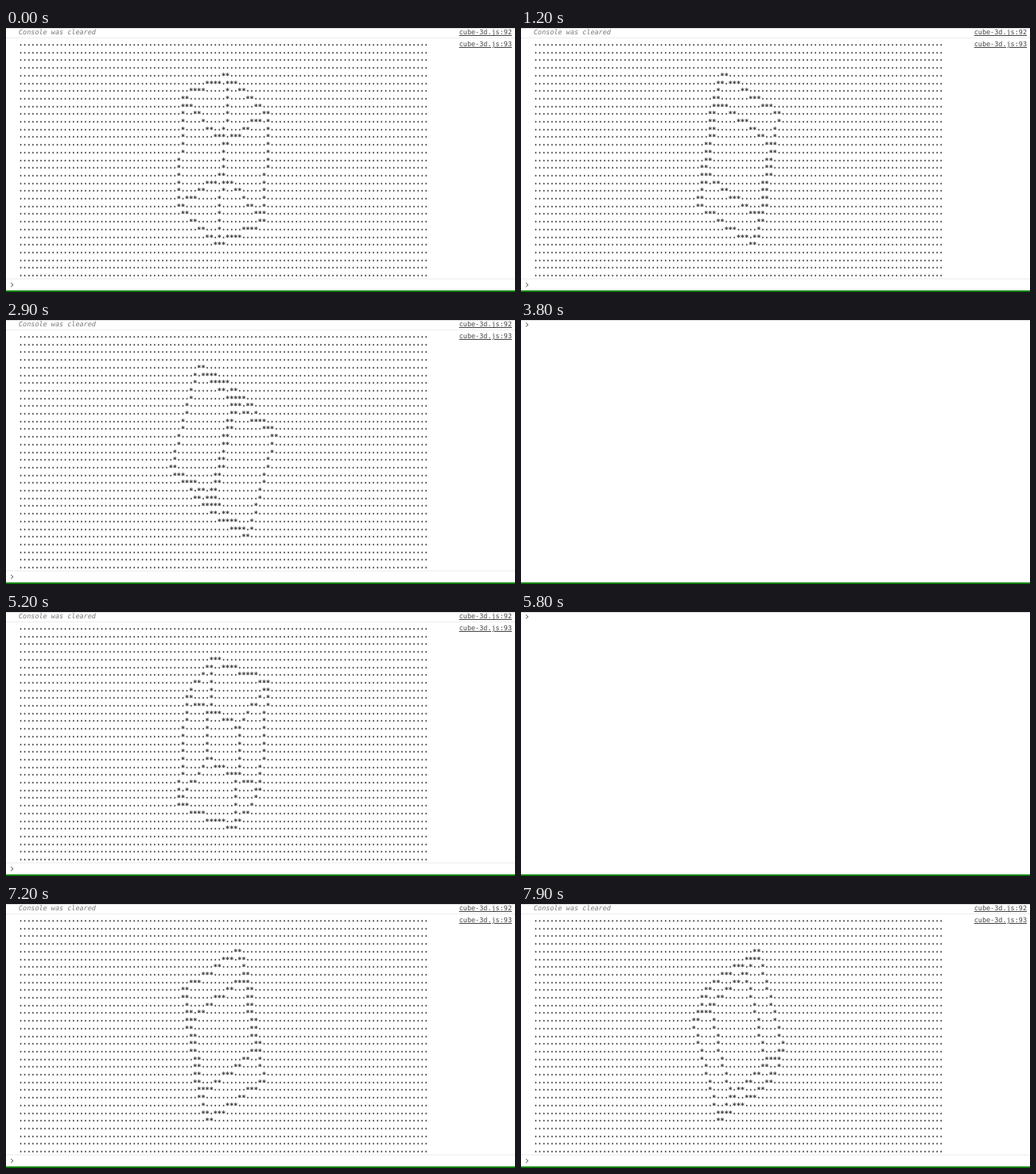
An HTML page for the animation above (8 s loop, 640 px wide and 333 px high).

```html
<!DOCTYPE html>
<html lang="en">
<head>
<meta charset="utf-8">
<title>Console cube</title>
<style>
html, body { margin: 0; width: 100%; height: 100%; overflow: hidden; background: #fff; }
body { position: relative; font: 8.47px/10px "DejaVu Sans Mono", "Liberation Mono", monospace; text-rendering: geometricPrecision; color: #303030; }
body * { position: absolute; margin: 0; font: inherit; white-space: pre; }
#log { inset: 0; }
pre { left: 16px; line-height: 9.71px !important; }
#dots { top: 15px; -webkit-text-stroke: 0.5px; }
#stars { top: 17px; -webkit-text-stroke: 0.3px; }
#note { left: 16px; top: 0.4px; font-style: italic; color: #777; }
.link { right: 4px; color: #444; text-decoration: underline; }
.rule { left: 0; width: 640px; height: 1px; background: #eee; }
#prompt { left: 5px; width: 5px; height: 6px; fill: none; stroke: #555; }
#edge { left: 0; top: 331px; width: 640px; height: 2px; background: #008000; }
</style>
</head>
<body>
<div class="rule" style="top:0;background:#ddd"></div>
<div id="log">
  <span id="note">Console was cleared</span>
  <span class="link" style="top:0.4px">cube-3d.js:92</span>
  <div class="rule" style="top:12px"></div>
  <span class="link" style="top:15px">cube-3d.js:93</span>
  <pre id="dots"></pre>
  <pre id="stars"></pre>
  <div class="rule" style="top:316px"></div>
</div>
<svg id="prompt" viewBox="0 0 5 6"><path d="M1 .5L4 3L1 5.5"/></svg>
<div id="edge"></div>
<script>
const COLS = 101, ROWS = 31, LOOP = 8000;
const redraws = [100, 500, 900, 1200, 1500, 1900, 2200, 2500, 2800, 3200, 3500, 3800,
  4200, 4400, 4900, 5200, 5500, 5800, 6200, 6500, 6800, 7200, 7500, 7800];
const clears = [500, 2800, 3800, 5800, 6800, 7800];
// cube edge vectors: horizontal radius, height, azimuth in degrees
const axes = [[6.54, 13.41, 351.7], [13.92, 5.36, 132], [14.44, 3.75, 228]];
const $ = id => document.getElementById(id);

function line(grid, [x0, y0], [x1, y1]) {
  const n = Math.max(Math.abs(x1 - x0), Math.abs(y1 - y0));
  for (let i = 0; i <= n; i++) {
    const x = Math.round(x0 + (x1 - x0) * i / n);
    const y = Math.round(y0 + (y1 - y0) * i / n);
    grid[y][x] = '*';
  }
}

function draw(step) {
  const grid = Array.from({ length: ROWS }, () => Array(COLS).fill('.'));
  const edges = axes.map(([r, y, a]) => [r * Math.sin((a - 10 * step) * Math.PI / 180), y]);
  const corner = bits => [0, 1].map(k => {
    const sum = edges.reduce((s, e, i) => s + (bits >> i & 1 ? e[k] : -e[k]) / 2, 0);
    return Math.round(sum) + (k ? 15 : 50);
  });
  for (let a = 0; a < 8; a++)
    for (let bit = 1; bit < 8; bit *= 2)
      if (!(a & bit)) line(grid, corner(a), corner(a | bit));
  const text = grid.map(row => row.join('')).join('\n');
  $('dots').textContent = text.replace(/\*/g, ' ');
  $('stars').textContent = text.replace(/\./g, ' ');
}

let shown = -1;
function tick() {
  const t = performance.now() % LOOP;
  const step = redraws.filter(r => r <= t).length;
  const blank = clears.some(c => t >= c && t < c + 100);
  if (step !== shown) draw(shown = step);
  $('log').style.visibility = blank ? 'hidden' : 'visible';
  $('prompt').style.top = blank ? '3px' : '321px';
  requestAnimationFrame(tick);
}
tick();
</script>
</body>
</html>
```
